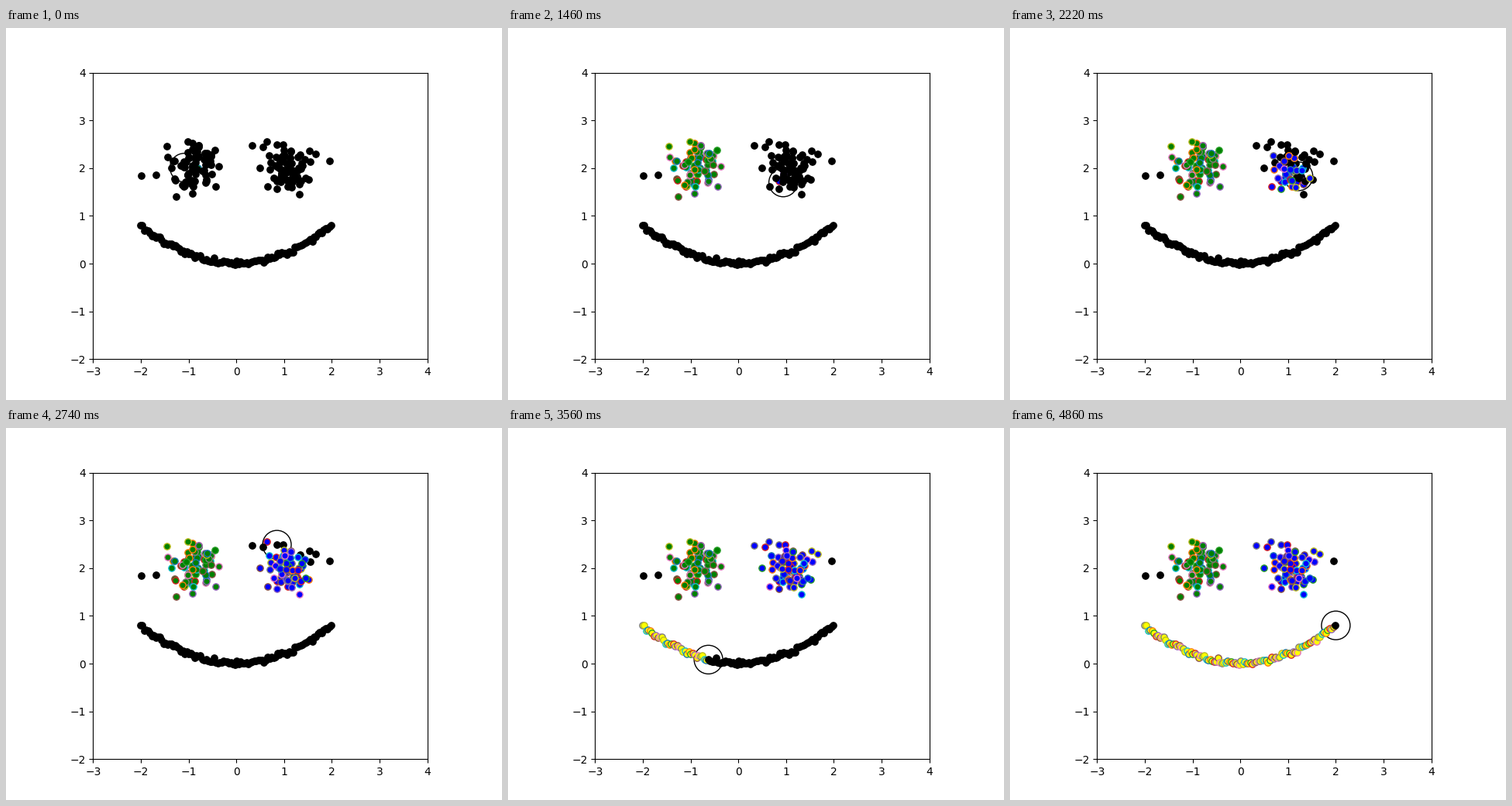
Recreate the animation shown at these times as a matplotlib script. Size 640 by 480 pixels, loop 4880 ms.

```python
import numpy as np
import matplotlib.pyplot as plt
from matplotlib.animation import FuncAnimation
from matplotlib.colors import to_rgba

RADIUS = 0.3
FRAMES, INTERVAL = 244, 20
rng = np.random.default_rng(12)


def cloud(x, y, size, n):
    """Random points around a centre, denser towards the middle."""
    r, a = size * rng.random(n) ** 0.6, rng.random(n) * 2 * np.pi
    return np.column_stack([x + r * np.cos(a), y + r * np.sin(a)])


def by_layer(pts):
    """Order points the way a search spreads from the first one."""
    layer = np.hypot(*(pts - pts[0]).T) // RADIUS
    return pts[np.argsort(layer, kind="stable")]


# Each eye: the first points visited, a random core and a few rim points.
left = by_layer(np.vstack([
    [(-.80, 2.00), (-1.09, 2.01)],
    cloud(-.93, 2.05, .48, 63),
    [(-.36, 2.03), (-.91, 1.46), (-1.01, 2.55), (-.44, 2.37),
     (-.42, 1.60), (-1.43, 2.23), (-1.25, 1.40), (-1.44, 2.45)],
]))
right = by_layer(np.vstack([
    [(.86, 1.72), (.95, 1.88), (.94, 1.70)],
    cloud(1.03, 1.96, .46, 58),
    [(.50, 2.00), (.67, 1.60), (1.52, 1.75), (1.33, 1.44), (.65, 2.55),
     (.85, 2.49), (.98, 2.48), (1.35, 2.27), (.56, 2.43), (1.56, 2.12),
     (.34, 2.46), (1.54, 2.35), (1.67, 2.29)],
]))
noise = np.array([(-1.98, 1.84), (-1.67, 1.85), (1.96, 2.14)])

x = np.linspace(-2, 2, 100)
jitter = rng.normal(0, .025, x.size)
jitter[[0, -1]] = 0
mouth = np.column_stack([x, 0.2 * x ** 2 + jitter])

# Stacking order is random within an eye, with the first point at the bottom.
points, found, fills, route = [noise], [np.full(3, FRAMES + 1)], ["black"] * 3, []
start = 0
for pts, color, mixed in [(left, "green", True), (right, "blue", True),
                          (mouth, "yellow", False)]:
    n = len(pts)
    order = np.arange(n)
    if mixed:
        order[1:] = rng.permutation(order[1:])
    points.append(pts[order])
    found.append(start + order)
    fills += [color] * n
    route.append(pts[1:])
    start += n - 1
points, found, route = map(np.concatenate, (points, found, route))
fills = np.array([to_rgba(c) for c in fills])
cycle = np.array([to_rgba(f"C{i}") for i in range(10)])
black = np.array(to_rgba("black"))

fig, ax = plt.subplots(figsize=(6.4, 4.8), dpi=100)
ax.set_aspect("equal")
ax.set_xlim(-3, 4)
ax.set_ylim(-2, 4)
ax.apply_aspect()

# Dots sit on whole pixels.
pixels = np.round(ax.transData.transform(points))
points = ax.transData.inverted().transform(pixels)
dots = ax.scatter(*points.T, s=36, linewidths=1, c="black", zorder=2)
ring = ax.add_patch(plt.Circle(route[0], RADIUS, fill=False, color="black"))


def update(frame):
    seen = found <= frame
    # Outlines run through the colour cycle over the labelled points only.
    rank = np.cumsum(seen) - 1
    dots.set_facecolors(np.where(seen[:, None], fills, black))
    dots.set_edgecolors(np.where(seen[:, None], cycle[rank % 10], black))
    ring.center = route[frame]
    return dots, ring


anim = FuncAnimation(fig, update, frames=FRAMES, interval=INTERVAL,
                     repeat=True, repeat_delay=0)
plt.show()
```
